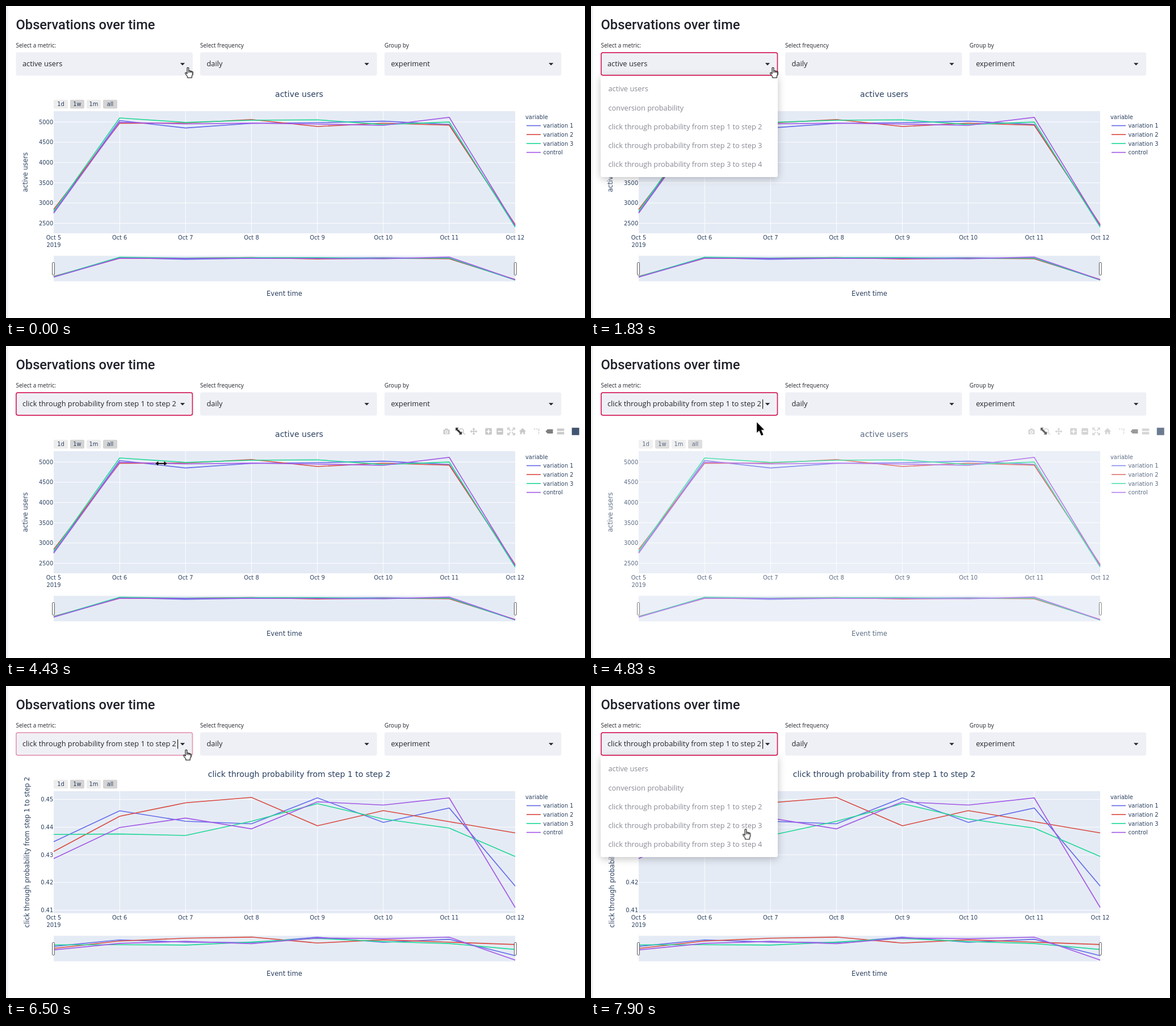
An HTML page for the animation above (8 s loop, 1020 by 549 pixels).

```html
<!DOCTYPE html>
<html lang="en">
<head>
<meta charset="utf-8">
<title>Observations over time</title>
<style>
html, body { margin: 0; width: 100%; height: 100%; overflow: hidden; background: #fff; }
svg { display: block; width: 100%; height: 100%; }
.ui { font-family: "Open Sans", "Noto Sans", sans-serif; font-size: 12.8px; fill: #22242c; }
.ui .label { font-size: 10px; }
.heading { font: 500 23.65px Roboto, sans-serif; fill: #1f212a; }
.plot { font-family: "DejaVu Sans", sans-serif; font-size: 9.9px; fill: #2a3f5f; }
.plot .title { font-size: 14px; }
.plot .axis { font-size: 11.55px; }
.mid { text-anchor: middle; }
.end { text-anchor: end; }
.line { fill: none; stroke-width: 1.65; }
.items text { fill: #888a95; }
.shadow { filter: drop-shadow(0 3px 7px rgba(0,0,0,.24)); }

.anim { animation: 8s linear infinite; }
.step { animation: 8s step-end infinite; }
.before { animation-name: before; }
.after { animation-name: after; }
.oldPlot { animation-name: oldPlot; }
.newPlot { animation-name: newPlot; }
.stale { animation-name: stale; }
.fresh { animation-name: fresh; }
.tools { animation-name: tools; }
.focus { animation-name: focus; }
.menu { animation-name: menu; }
.caret { animation-name: caret; }
.pointer { animation-name: pointer; }
.hand { animation-name: hand; }
.resize { animation-name: resize; }
.arrow { animation-name: arrow; }

/* one percent is 80 ms */
@keyframes before { 0% { opacity: 1 } 46.25%, 100% { opacity: 0 } }
@keyframes after { 0% { opacity: 0 } 46.25%, 100% { opacity: 1 } }
@keyframes oldPlot { 0% { opacity: 1 } 64.5%, 100% { opacity: 0 } }
@keyframes newPlot { 0% { opacity: 0 } 64.5%, 100% { opacity: 1 } }
@keyframes stale {
  0% { opacity: 1 }
  53.75% { opacity: 1; animation-timing-function: ease-in }
  66.25%, 100% { opacity: .33 }
}
@keyframes fresh { 0%, 64.5% { opacity: .5 } 67%, 100% { opacity: 1 } }
@keyframes tools { 0%, 47.5% { opacity: 0 } 50.4%, 61% { opacity: 1 } 63.7%, 100% { opacity: 0 } }
@keyframes focus {
  0%, 16.25% { opacity: 0 }
  18%, 78.7% { opacity: 1 }
  80.4%, 81.3% { opacity: .42 }
  83%, 100% { opacity: 1 }
}
@keyframes menu {
  0%, 16.25% { opacity: 0 }
  18.75%, 46.25% { opacity: 1 }
  48.75%, 81.3% { opacity: 0 }
  83.75%, 100% { opacity: 1 }
}
@keyframes caret {
  0%, 22.8%, 37%, 53.7%, 66.9%, 78.7%, 87.8% { opacity: 0 }
  17%, 29.6%, 44.5%, 60.3%, 72.8%, 81.2%, 94.5%, 100% { opacity: 1 }
}
@keyframes pointer {
  0%, 22.9% { transform: translate(320.5px, 108px); animation-timing-function: ease-in }
  27% { transform: translate(306px, 134px) }
  33% { transform: translate(276px, 186px); animation-timing-function: ease-out }
  40.3% { transform: translate(260.5px, 217.5px) }
  42.9%, 53.7% { transform: translate(261px, 219px) }
  55.3% { transform: translate(273px, 208px) }
  60.3% { transform: translate(291px, 135px) }
  62.5%, 87.3% { transform: translate(317.5px, 112px); animation-timing-function: ease-in-out }
  97.9% { transform: translate(273px, 251px) }
  98.7%, 100% { transform: translate(272.5px, 251.5px) }
}
@keyframes hand { 0% { opacity: 1 } 47.9% { opacity: 0 } 62%, 100% { opacity: 1 } }
@keyframes resize { 0% { opacity: 0 } 47.9% { opacity: 1 } 57%, 100% { opacity: 0 } }
@keyframes arrow { 0% { opacity: 0 } 57% { opacity: 1 } 62%, 100% { opacity: 0 } }
</style>
</head>
<body>
<svg viewBox="0 0 1020 549" id="stage"></svg>
<script>
const left = 84, right = 897, top_ = 185, bottom = 400, sliderTop = 439.5;
const gap = (right - left) / 7;
const colors = ["#636ae8", "#d94a40", "#1fd896", "#a259e6"];
const names = ["variation 1", "variation 2", "variation 3", "control"];
const metrics = ["active users", "conversion probability",
  ...[1, 2, 3].map(n => `click through probability from step ${n} to step ${n + 1}`)];

const text = (x, y, s, cls = "") => `<text x="${x}" y="${y}" class="${cls}">${s}</text>`;
const rect = (x, y, w, h, fill, more = "") =>
  `<rect x="${x}" y="${y}" width="${w}" height="${h}" fill="${fill}" ${more}/>`;
const group = (cls, body) => `<g class="${cls}">${body}</g>`;
const path = (d, more = "") => `<path d="${d}" ${more}/>`;
const at = (x, y, body) => `<g transform="translate(${x} ${y})">${body}</g>`;

const lines = (rows, toY) => rows.map((row, k) =>
  `<polyline class="line" stroke="${colors[k]}" points="${
    row.map((y, i) => `${left + i * gap},${toY(y)}`).join(" ")}"/>`).join("");

function plot({ title, axisX, ticks, firstTick, tickGap, rows }) {
  let out = rect(left, top_, right - left, bottom - top_, "#e5ebf5");
  for (let i = 0; i < 8; i++) {
    const x = left + i * gap;
    if (i % 7) out += rect(x - .45, top_, .9, bottom - top_, "#fff");
    out += text(x, 411, `Oct ${i + 5}`, "mid");
  }
  ticks.forEach((t, i) => {
    const y = firstTick + i * tickGap;
    out += rect(left, y - .45, right - left, .9, "#fff") + text(83.2, y + 3.7, t, "end");
  });
  out += text(left, 424, "2019", "mid") + lines(rows, y => y);

  out += rect(left, sliderTop, right - left, 45, "#e5ebf5");
  out += lines(rows, y => sliderTop + (y - top_) * 45 / (bottom - top_));
  for (const x of [left - .5, right + .3])
    out += rect(x - 1.9, 451.4, 3.8, 22, "#fff", 'rx="1" stroke="#444" stroke-width=".9"');

  ["1d", "1w", "1m", "all"].forEach((s, i) => {
    const x = left + i * 29;
    out += rect(x, 165, 25, 15.5, i % 2 ? "#d4d4d4" : "#ededed", 'rx="2"');
    out += text(x + 12.5, 176.3, s, "mid");
  });

  out += text(915, 198.5, "variable");
  names.forEach((s, i) => {
    const y = 210.5 + i * 15.7;
    out += rect(917, y - .8, 25, 1.65, colors[i]) + text(946.5, y + 3.7, s);
  });

  out += text(516.5, 160, title, "title mid") + text(490.5, 509.7, "Event time", "axis mid");
  out += `<text class="axis mid" transform="translate(${axisX} 292.5) rotate(-90)">${title}</text>`;
  return out;
}

function toolbar() {
  const square = rect(-5.8, -5.8, 11.6, 11.6, "#c7c7c7", 'rx="1.5"');
  const stroke = 'fill="none" stroke="#c7c7c7" stroke-width="1.6"';
  const white = 'stroke="#fff" stroke-width="1.8"';
  const heads = [0, 90, 180, 270].map(a =>
    path("M0-6.5L2.6-3.4H-2.6Z", `transform="rotate(${a})"`)).join("");
  const corners = [0, 90, 180, 270].map(a =>
    path("M-6-2.5V-6H-2.5M-4.8-4.8L-1.2-1.2", `transform="rotate(${a})" ${stroke}`)).join("");
  const icons = [
    [776, path("M-5.5-3H-3L-2-5H2L3-3H5.5V5H-5.5Z") +
      '<circle cy="1" r="2.3" fill="none" stroke="#fff" stroke-width="1.3"/>'],
    [803, `<circle cx="-1" cy="-1" r="3.8" ${stroke}/>` + path("M2 2L5.5 5.5", stroke)],
    [797.5, path("M-5.5-6.5H0L-2-4.5L4 1.5L5.5 0V5.5H0L1.8 3.7L-4.2-2.3L-5.5-1Z", 'fill="#333"')],
    [824, heads + path("M-5 0H5M0-5V5", stroke)],
    [850, square + path("M-3.6 0H3.6M0-3.6V3.6", white)],
    [870, square + path("M-3.6 0H3.6", white)],
    [890, corners],
    [910, path("M0-5.8L6.2 0H4.3V5H1.3V1.8H-1.3V5H-4.3V0H-6.2Z")],
    [935, path("M-5-4H5M3.5-3V6", stroke + ' stroke-dasharray="2.4 1.8"')],
    [957, path("M-6.5 0L-3-3.8H6.5V3.8H-3Z", 'fill="#7c7c7c"')],
    [977, rect(-6.3, -5, 12.6, 4.2, "#c7c7c7") + rect(-6.3, 1, 12.6, 4.2, "#c7c7c7")],
    [1003.3, rect(-6.5, -6.5, 13, 13, "#40536f")]
  ];
  return `<g fill="#c7c7c7">${icons.map(([x, body]) => at(x, 150.3, body)).join("")}</g>`;
}

const field = (x, label, value) =>
  text(x, 73, label, "label") + rect(x, 81.5, 311.5, 41, "#eff0f5", 'rx="3.3"') +
  text(x + 11.5, 106.4, value) + path(`M${x + 289.3} 100.2h8.4l-4.2 4.4z`);

const caret = x => group("step caret", rect(x, 94, 1.1, 16.5, "#111"));

const usersPlot = plot({
  title: metrics[0], axisX: 38, firstTick: 204, tickGap: 35.67,
  ticks: [5000, 4500, 4000, 3500, 3000, 2500],
  rows: [
    [363.5, 201.5, 214.6, 206.5, 205.3, 202.6, 208.5, 386.5],
    [358, 206.3, 206, 199.8, 212, 206.3, 209.8, 384.5],
    [361, 197, 204.8, 201, 200.3, 208.6, 204.2, 389],
    [364.5, 204.6, 207.5, 206.2, 207.8, 210, 196, 386.5]
  ]
});
const stepPlot = plot({
  title: metrics[2], axisX: 40.5, firstTick: 199.6, tickGap: 48.7,
  ticks: ["0.45", "0.44", "0.43", "0.42", "0.41"],
  rows: [
    [274, 219.5, 238, 242.5, 196.8, 240, 214.6, 352],
    [291.3, 229.3, 205.5, 196, 246, 219.3, 238.8, 258.5],
    [261.3, 260.4, 263, 238, 207, 234, 250, 300],
    [303.7, 249, 232.4, 251.3, 203.8, 209.5, 197, 389.7]
  ]
});

const menu = rect(17, 122.5, 312, 178.5, "#fff", 'rx="3.3" class="shadow"') +
  group("items", metrics.map((s, i) => text(30.5, 150.3 + i * 33.25, s)).join(""));

const hand = `<g fill="#fff" stroke="#000" stroke-width="1.1" stroke-linejoin="round">${
  path("M-1.4 1Q0-.6 1.4 1V6.2Q3 5.2 4 6.6Q5.4 5.8 6.2 7.2Q8 6.6 8.2 8.6V12.5L6.8 16V18.2H-.8V16.2L-4.6 11Q-5.4 9-3.6 9.2L-1.4 11.2Z") +
  path("M1.4 6.2V9.4M4 6.6V9.4M6.2 7.4V9.6", 'fill="none"')}</g>`;
const outline = 'stroke="#fff" stroke-width="1" paint-order="stroke"';
const resize = path("M-10.5 0L-5-4V-1.1H5V-4L10.5 0L5 4V1.1H-5V4Z", outline);
const arrow = path("M0 0V18.5L4.2 14.8L8 23.5L11.5 22L7.8 13.4H13.2Z", outline);

document.getElementById("stage").innerHTML =
  rect(0, 0, 4, 549, "#f2f3f7") +
  group("plot",
    group("step oldPlot", group("anim stale", usersPlot + group("anim tools", toolbar()))) +
    group("step newPlot", group("anim fresh", stepPlot))) +
  text(17.5, 41, "Observations over time", "heading") +
  group("ui",
    field(17.5, "Select a metric:", "") +
    field(342, "Select frequency", "daily") +
    field(666.7, "Group by", "experiment") +
    group("step before", text(29, 106.4, metrics[0]) + caret(102)) +
    group("step after", text(29, 106.4, metrics[2]) + caret(302)) +
    group("anim menu", menu) +
    group("anim focus", rect(17.9, 82.2, 310.6, 39.6, "none", 'rx="3" stroke="#d6215c" stroke-width="1.7"'))) +
  group("anim pointer",
    group("step hand", hand) + group("step resize", resize) + group("step arrow", arrow));
</script>
</body>
</html>
```
